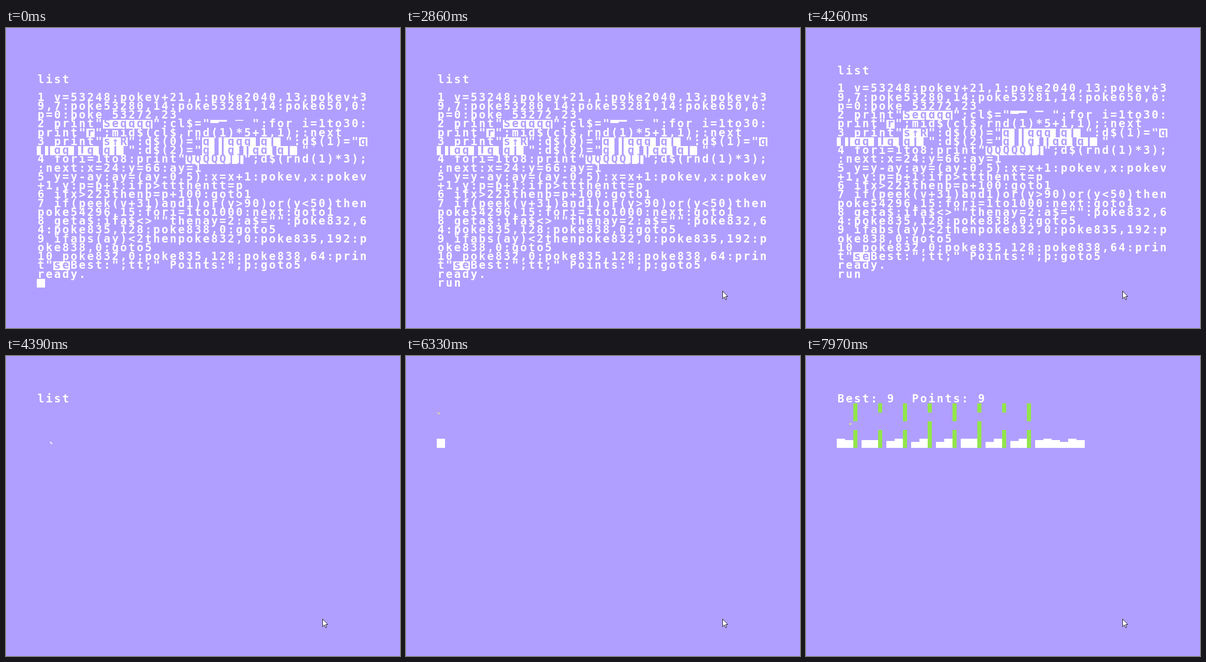
An HTML page for the animation above (8 s loop, 858 by 653 pixels).

```html
<!DOCTYPE html>
<html lang="en">
<head>
<meta charset="utf-8">
<title>BASIC listing and game</title>
<style>
  html, body { margin: 0; width: 100%; height: 100%; overflow: hidden; background: #b19fff; }
  svg { display: block; }
  rect { shape-rendering: crispEdges; }
  text {
    font: bold 24px "DejaVu Sans Mono", "Liberation Mono", monospace;
    letter-spacing: 3.55px;
    white-space: pre;
    font-variant-ligatures: none;
  }
</style>
</head>
<body>
<svg id="stage" width="858" height="653" viewBox="0 0 858 653"></svg>
<script>
const BG = '#b19fff', WHITE = '#fff', GREEN = '#92e54b', YELLOW = '#f5f278';
const LEFT = 67, TOP = 84, CW = 18, CH = 19.25, PW = CW / 8, PH = CH / 8;
const INDENT = 1.78;   // centres a glyph in its cell
const LOOP = 8000;

// {…} is reversed, ▌ a half block, | a reversed bar, ▔▀█ blocks hanging from the cell top
const listing = [
  '1 v=53248:pokev+21,1:poke2040,13:pokev+3',
  '9,7:poke53280,14:poke53281,14:poke650,0:',
  'p=0:poke 53272,23',
  '2 print"{Seqqqq}":cl$="█▀ ▔ ":for i=1to30:',
  'print"{r}";mid$(cl$,rnd(1)*5+1,1);:next',
  '3 print"{s↑R}":d$(0)="{q}▌{|qqq}▌{q|}▌":d$(1)="{q}',
  '▌{|qq}▌{|q}▌{q|}▌":d$(2)="{q}▌{|q}▌{|qq}▌{q|}▌"',
  '4 fori=1to8:print"{QQQQQ]]}";d$(rnd(1)*3);',
  ':next:x=24:y=66:ay=1',
  '5 y=y-ay:ay=(ay-0.5):x=x+1:pokev,x:pokev',
  '+1,y:p=p+1:ifp>ttthentt=p',
  '6 ifx>223thenp=p+100:goto1',
  '7 if(peek(v+31)and1)or(y>90)or(y<50)then',
  'poke54296,15:fori=1to1000:next:goto1',
  '8 geta$:ifa$<>""thenay=2:a$="":poke832,6',
  '4:poke835,128:poke838,0:goto5',
  '9 ifabs(ay)<2thenpoke832,0:poke835,192:p',
  'oke838,0:goto5',
  '10 poke832,0:poke835,128:poke838,64:prin',
  't"{se}Best:";tt;" Points:";p:goto5',
  'ready.'
];

const stage = document.getElementById('stage');

function el(tag, parent, attrs = {}) {
  const node = document.createElementNS('http://www.w3.org/2000/svg', tag);
  for (const name in attrs) node.setAttribute(name, attrs[name]);
  return parent.appendChild(node);
}
const rect = (parent, x, y, width, height, fill) => el('rect', parent, { x, y, width, height, fill });
const show = (node, on) => node.setAttribute('visibility', on ? 'inherit' : 'hidden');
const move = (node, x, y) => node.setAttribute('transform', `translate(${x} ${y})`);
const colX = col => LEFT + col * CW;
const rowY = row => TOP + row * CH;

// Block drawn in units of the 8 by 8 cell
const block = (parent, col, row, x, y, w, h, fill) =>
  rect(parent, colX(col) + x * PW, rowY(row) + y * PH, w * PW, h * PH, fill);

function textLine(parent, row, text = '') {
  const node = el('text', parent, { x: LEFT + INDENT, y: rowY(row) + 7 * PH, fill: WHITE });
  node.textContent = text;
  return node;
}

function codeLine(parent, row, source) {
  const cells = el('g', parent), line = textLine(parent, row);
  let col = 0;
  let reversed = false;
  for (const part of source.match(/[{}|▌▔▀█]|[^{}|▌▔▀█]+/g)) {
    if (part === '{' || part === '}') { reversed = part === '{'; continue; }
    if (reversed) block(cells, col, row, 0, 0, 8 * part.length, 8, WHITE);
    const hang = '▔▀█'.indexOf(part) + 1;
    if (part === '|') block(cells, col, row, 3, 0, 2, 8, BG);
    else if (part === '▌') block(cells, col, row, 0, 0, 4, 8, WHITE);
    else if (hang) block(cells, col, row, 0, 0, 8, hang, WHITE);
    else el('tspan', line, { x: colX(col) + INDENT, fill: reversed ? BG : WHITE }).textContent = part;
    col += part.length;
  }
}

// Skyline digits are missing pixel rows; each pipe lists the text rows it fills
const A = '1245', B = '145', C = '1345';
function level(start, end, groundAt, pipesAt, sky, pipes) {
  const group = el('g', stage);
  const ground = [...sky].map((gap, col) => block(group, col, 5, 0, +gap, 8, 8 - gap, WHITE));
  const posts = pipes.map((rows, i) => {
    const post = el('g', group), col = 3 * i + 2;
    block(post, col, 5, 0, 0, 8, 8, BG);
    for (const row of rows) block(post, col, +row, 0, 0, 4, 8, GREEN);
    return post;
  });
  return t => {
    show(group, t >= start && t < end);
    const step = (pipesAt - groundAt) / ground.length;
    ground.forEach((cell, i) => show(cell, t >= groundAt + (i + 1) * step));
    posts.forEach((post, i) => show(post, t >= pipesAt + i * 30));
  };
}

const screen = el('g', stage);
textLine(screen, 1, 'list');
const code = el('g', screen);
listing.forEach((source, i) => codeLine(code, i + 3, source));
const typed = textLine(code, 24);
const caret = block(code, 0, 24, 0, 0, 8, 8, WHITE);

const levels = [
  level(4450, 6260, 4470, 4905, '220020100000300020000030200100', [A, A, A, B, C, B, B, B]),
  level(6260, LOOP, 6310, 6750, '010110200300303001300202101301', [A, B, A, C, A, C, B, A])
];
const score = textLine(stage, 0);
const bird = el('g', stage);
const wings = [0, 1].map(() => rect(bird, 0, 0, PW, PH, YELLOW));
const pointer = el('path', stage, {
  d: 'M0 0V16.5L3.8 12.9L6.3 18.8L8.8 17.7L6.4 12H11.5Z',
  fill: WHITE, stroke: '#000', 'stroke-width': 1
});

const blinks = [330, 660, 990, 1320, 1650, 2000, 2330, 2510, 2860, 3130, 3460, 3860, 4130];
const keys = [2270, 2400, 2510];
const hops = [7130, 7200, 7270, 7340, 7410, 7520, 7630, 7735, 7840, 7900, 7970];
const passed = (times, t) => times.filter(time => time <= t).length;

function drawScreen(t) {
  show(screen, t < 4450);
  show(code, t < 4390);
  move(screen, 0, t < 4260 ? 0 : -CH);
  const count = passed(keys, t);
  typed.textContent = 'run'.slice(0, count);
  caret.setAttribute('x', colX(count));
  show(caret, passed(blinks, t) % 2 === 0);
}

function drawBird(t) {
  const n = passed(hops, t);
  let x = 25 + n, y = 65, ay = 0.5;
  for (let i = 1; i <= n; i++) {
    if (i === 10) ay = 2;   // flap
    y -= ay;
    ay -= 0.5;
  }
  if (t < 5125) { x = 37; y = 92; }
  const lift = n === 10 ? -1 : t < 7080 || ay <= -2 ? 1 : 0;
  show(bird, t >= 4390);
  move(bird, LEFT + (x - 24) * PW, TOP + (Math.floor(y) - 49) * PH);
  move(wings[1], PW, lift * PH);
  wings.forEach(wing => wing.setAttribute('fill', t < 4450 ? WHITE : YELLOW));
  const points = Math.min(n + 1, 9);
  score.textContent = n < 5 ? '' : `Best: ${points}  Points: ${points}`;
}

function drawPointer(t) {
  const k = Math.min(Math.max((t - 130) / 490, 0), 1);
  const ease = 1 - (1 - k) ** 2;
  show(pointer, t >= 130);
  move(pointer, t < 1355 ? 720 - 28 * ease : 689.5, 579.5 - 7 * ease);
}

function frame() {
  const t = performance.now() % LOOP;
  drawScreen(t);
  levels.forEach(draw => draw(t));
  drawBird(t);
  drawPointer(t);
  requestAnimationFrame(frame);
}
frame();
</script>
</body>
</html>
```
